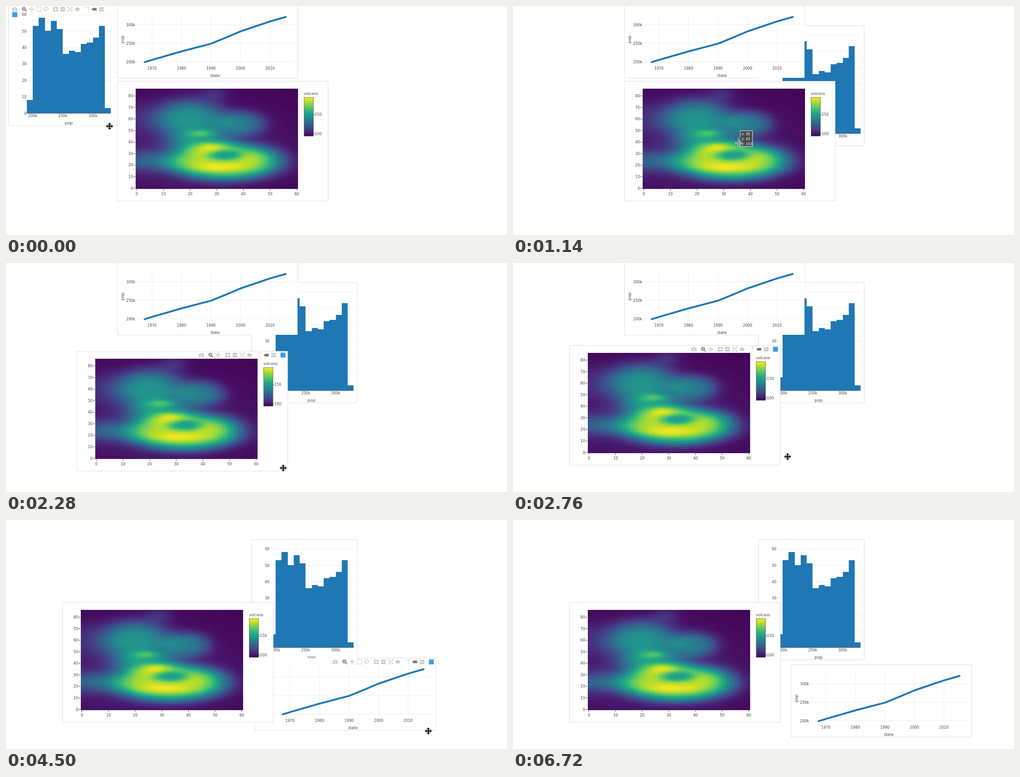
An HTML page with a canvas that plays this animation: 1105 px wide and 507 px high, repeating every 6780 ms.

```html
<!DOCTYPE html>
<html lang="en">
<head>
<meta charset="utf-8">
<title>Draggable charts</title>
<style>
html, body { margin: 0; width: 100%; height: 100%; overflow: hidden; background: #fff; }
#stage { position: relative; width: 1105px; height: 507px; overflow: hidden; }
#stage > * { position: absolute; left: 0; top: 0; }
.frame { box-sizing: border-box; border: 1px solid #ddd; }
.plot { background: #fff; clip-path: inset(1px); }
.plot > * { position: absolute; left: 0; top: 0; }
.plot canvas { left: 40.5px; top: 17px; width: 358.4px; height: 222.4px; image-rendering: pixelated; }
.over { z-index: 9; }
svg { display: block; overflow: visible; }
text { font-family: "DejaVu Sans", Verdana, sans-serif; fill: #444; }
.tip text { font: 8.67px "Liberation Sans", Arial, sans-serif; fill: #fff; }
</style>
</head>
<body>
<div id="stage"></div>
<script>
const LOOP = 6780;
const BLUE = '#1f77b4';
const stage = document.getElementById('stage');

// ---- drawing helpers ----
const text = (x, y, s, anchor = 'middle', size = 8) =>
  `<text x="${x}" y="${y}" text-anchor="${anchor}" font-size="${size}">${s}</text>`;
const title = (x, y, s) => text(x, y, s, 'middle', 9.33);
const line = (x1, y1, x2, y2, color = '#eee') =>
  `<path d="M${x1} ${y1}L${x2} ${y2}" stroke="${color}" fill="none"/>`;
const repeat = (n, fn) => Array.from({ length: n }, (_, i) => fn(i)).join('');

function add(parent, tag, cls, html = '') {
  const el = document.createElement(tag);
  el.className = cls;
  el.innerHTML = html;
  parent.append(el);
  return el;
}

// ---- motion helpers ----
const play = (el, frames) => el.animate(frames, { duration: LOOP, iterations: Infinity });

// track: [ms, x, y] key points, held after the last one
function move(el, track) {
  const held = [...track, [LOOP, ...track[track.length - 1].slice(1)]];
  play(el, held.map(([ms, x, y]) => ({ offset: ms / LOOP, transform: `translate(${x}px,${y}px)` })));
}

// spans: [from, to] times at which the element is shown
function show(el, ...spans) {
  const keys = [[0, 0], ...spans.flatMap(([from, to]) => [[from, 1], [to, 0]])];
  play(el, [...keys, [LOOP, 0]].map(([ms, opacity]) => ({ offset: ms / LOOP, opacity, easing: 'steps(1, end)' })));
}

// ---- toolbar ----
const stroke = (d, w = 1.3, dash = '') =>
  `<path d="${d}" fill="none" stroke="currentColor" stroke-width="${w}" stroke-dasharray="${dash}"/>`;
const fill = d => `<path d="${d}" fill="currentColor" fill-rule="evenodd"/>`;
const dot = (x, y, r) => `<circle cx="${x}" cy="${y}" r="${r}" fill="currentColor"/>`;
const square = 'M-5-5H5V5H-5Z';
const icons = {
  camera: fill('M-5.5-3H-3L-2-4.5H2L3-3H5.5V4.5H-5.5Z M0-2A2.6 2.6 0 1 0 .01-2Z') + dot(0, .6, 1.3),
  zoom: stroke('M-1-4.4A3.4 3.4 0 1 0-.99-4.4ZM1.6 1.6L5 5', 1.9) + stroke('M-2.6-1H.6M-1-2.6V.6', 1),
  pan: stroke('M-5 0H5M0-5V5') + fill('M-6 0L-3.5-2V2ZM6 0L3.5-2V2ZM0-6L-2-3.5H2ZM0 6L-2 3.5H2Z'),
  select: stroke(square, 1.4, '2 1.33'),
  lasso: stroke('M-3 2C-7-1-3-5 1-4.5S6 0 3 1.5-2 2.5-3 1-1 4-2 5'),
  plus: fill(square + 'M-1-3.5V-1H-3.5V1H-1V3.5H1V1H3.5V-1H1V-3.5Z'),
  minus: fill(square + 'M-3.5-1V1H3.5V-1Z'),
  fit: stroke('M-5-2V-5H-2M2-5H5V-2M5 2V5H2M-2 5H-5V2M-3.5-3.5L3.5 3.5M3.5-3.5L-3.5 3.5', 1.1),
  home: fill('M-6 0L0-5 6 0 5 1 4 .2V4.5H1.2V1.5H-1.2V4.5H-4V.2L-5 1Z'),
  spike: stroke('M-4-4H1M3-1V5', 1.2, '2 1') + dot(3, -4, 1.4),
  tag: fill('M-5.5 0L-2.5-3H5.5V3H-2.5Z'),
  tags: fill('M-5.5-2.7L-4-4.5H5.5V-.8H-4ZM-5.5 2.7L-4 .8H5.5V4.5H-4Z'),
};

// Icons sit 16 apart, with 5 more between groups
function toolbar(x, drag = 'zoom pan select lasso', wrap = false) {
  const groups = ['camera', drag, 'plus minus fit home', 'spike tag tags'];
  let at = x;
  const body = groups.map(group => {
    const part = group.split(' ').map((name, i) =>
      `<g color="${/^(zoom|tag)$/.test(name) ? '#7c7c7c' : '#c7c7c7'}" transform="translate(${at + i * 16} 9)">${icons[name]}</g>`);
    at += part.length * 16 + 5;
    return part.join('');
  }).join('');
  const [lx, ly] = wrap ? [x, 21] : [at, 9];
  return `<g class="bar">${body}<rect x="${lx - 5.5}" y="${ly - 5.5}" width="11" height="11" fill="#3d9bea"/></g>`;
}

// ---- histogram ----
const counts = [8, 53, 58, 50, 56, 51, 36, 38, 37, 42, 43, 46, 53, 3];
const binX = i => 40.5 + i * 13.25;
const countY = n => 239 - n * 3.64;

function histogram() {
  const bars = counts.map((n, i) => `H${binX(i)}V${countY(n)}H${binX(i + 1)}`).join('');
  return repeat(7, i => line(41, countY(i * 10) + .5, 226, countY(i * 10) + .5) + text(40, countY(i * 10) + 3.5, i * 10, 'end')) +
    `<path d="M40.5 239.5${bars}V239.5Z" fill="${BLUE}" shape-rendering="crispEdges"/>` +
    line(40, 239.5, 226, 239.5, '#666') +
    repeat(3, i => text(binX(1 + 5 * i), 248, 200 + i * 50 + 'k')) +
    title(133, 263.5, 'pop') + toolbar(14, undefined, true);
}

// ---- line chart ----
const trend = [[1967.5, 199], [1970, 205], [1980, 228], [1990, 249], [1995, 265], [2000, 282], [2010, 309], [2015.3, 321]];
const yearX = year => 77 + (year - 1970) * 6.51;
const popY = k => 42.5 + (300 - k) * .82;

function lineChart() {
  return repeat(3, i => line(43, popY(200 + i * 50), 392, popY(200 + i * 50)) + text(40, popY(200 + i * 50) + 3, 200 + i * 50 + 'k', 'end')) +
    repeat(5, i => line(yearX(1970 + i * 10), 17, yearX(1970 + i * 10), 131) + text(yearX(1970 + i * 10), 142, 1970 + i * 10)) +
    `<polyline points="${trend.map(([year, k]) => [yearX(year), popY(k)])}" fill="none" stroke="${BLUE}" stroke-width="4" stroke-linecap="round" stroke-linejoin="round"/>` +
    title(216, 157.5, 'date') +
    `<g transform="translate(15 75) rotate(-90)">${title(0, 0, 'pop')}</g>` + toolbar(177);
}

// ---- heat map ----
const viridis = ['440154', '482475', '414487', '355f8d', '2a788e', '21918c', '22a884', '44bf70', '7ad151', 'bddf26', 'fde725'];

// The land is a sum of smooth hills; a higher power gives a flatter top
function height(x, y) {
  const hill = (cx, cy, rx, ry, h, power = 1) =>
    h * Math.exp(-((((x - cx) / rx) ** 2 + ((y - cy) / ry) ** 2) ** power));
  const cone = hill(33, 23, 21, 16, 78, 2) + hill(46, 28, 8, 11, 11) + hill(31, 18, 11, 4, 14);
  const crater = hill(33, 29, 6.5, 4.5, -33, 1.4);
  const ridge = hill(24, 40, 13, 10, 34, 1.5) + hill(27, 37, 5, 3, 12) + hill(25, 48, 5, 3, 17);
  const north = hill(20, 60, 13, 17, 46, 1.5) + hill(39, 56, 9, 11, 36, 1.5) + hill(29, 82, 5, 6, 10);
  const west = hill(4, 24, 16, 9, 26) + hill(2, 61, 10, 14, 9);
  const z = 94 + hill(22, 30, 45, 50, 8) + cone + crater + ridge + north + west;
  return Math.round(Math.min(195, z));
}

function shade(z) {
  const u = (z - 94) / 10.1, i = Math.min(9, Math.floor(u));
  const part = (s, k) => parseInt(s.slice(k, k + 2), 16);
  const mix = k => Math.round(part(viridis[i], k) + (u - i) * (part(viridis[i + 1], k) - part(viridis[i], k)));
  return `rgb(${mix(0)},${mix(2)},${mix(4)})`;
}

function paintHeat(canvas) {
  canvas.width = 61;
  canvas.height = 87;
  const ctx = canvas.getContext('2d');
  for (let y = 0; y < 87; y++) {
    for (let x = 0; x < 61; x++) {
      ctx.fillStyle = shade(height(x, y));
      ctx.fillRect(x, 86 - y, 1, 1);
    }
  }
}

const cellX = x => 43.5 + x * 5.875;
const cellY = y => 237.6 - y * 2.556;
const scaleY = z => 122 - (z - 94) * .85;

function heatMap() {
  const stops = viridis.map((c, i) => `<stop offset="${i / 10}" stop-color="#${c}"/>`).join('');
  return `<defs><linearGradient id="scale" x1="0" y1="1" x2="0" y2="0">${stops}</linearGradient></defs>` +
    repeat(9, i => line(36, cellY(i * 10), 40, cellY(i * 10), '#444') + text(35, cellY(i * 10) + 3, i * 10, 'end')) +
    repeat(7, i => line(cellX(i * 10), 239.5, cellX(i * 10), 243, '#444') + text(cellX(i * 10), 252.5, i * 10)) +
    text(412, 31, 'volcano', 'start') +
    '<rect x="412.5" y="36.5" width="20.5" height="85.5" fill="url(#scale)" stroke="#444" stroke-width=".7"/>' +
    repeat(2, i => line(433, scaleY(100 + i * 50), 436, scaleY(100 + i * 50), '#444') + text(436, scaleY(100 + i * 50) + 3, 100 + i * 50, 'start')) +
    toolbar(275, 'zoom pan');
}

// ---- cards: each is dragged once along its track, held at its grip ----
const hist = { w: 234, h: 267, draw: histogram, grip: [223, 268], frameZ: 2, plotZ: 2, bar: [[0, 780], [2850, 3240]],
  track: [[0, 5, -2], [720, 276, 50], [900, 694, 24], [1080, 541, 43]] };
const trendCard = { w: 399, h: 161, draw: lineChart, grip: [364, 153], frameZ: 1, plotZ: 3, bar: [[3240, 6120]],
  track: [[0, 245, -1], [3660, 245, -1], [4080, 286, 85], [4320, 440, 250], [4560, 585, 323], [4800, 613, 320]] };
const heat = { w: 466, h: 266, draw: heatMap, grip: [461, 261], frameZ: 4, plotZ: 4, bar: [[1260, 2820]],
  track: [[0, 245, 166], [1500, 245, 166], [1740, 428, 25], [2280, 156, 195], [2460, 124, 182]] };

for (const card of [hist, trendCard, heat]) {
  const frame = add(stage, 'div', 'frame');
  const plot = add(stage, 'div', 'plot');
  if (card === heat) paintHeat(add(plot, 'canvas', ''));
  plot.insertAdjacentHTML('beforeend', `<svg width="${card.w}" height="${card.h}">${card.draw()}</svg>`);
  for (const [el, z] of [[frame, card.frameZ], [plot, card.plotZ]]) {
    el.style.cssText = `width:${card.w}px;height:${card.h}px;z-index:${z}`;
    move(el, card.track);
  }
  show(plot.querySelector('.bar'), ...card.bar);
}

// ---- hover labels ----
function tip(span, x, y, w, color, rows) {
  const h = rows.length * 11 + 2, top = -h / 2;
  const el = add(stage, 'div', 'tip over', `<svg width="1" height="1"><path d="M0 0L4-4V${top}H${w + 4}V${-top}H4V4Z" fill="${color}" stroke="#fff"/>` +
    rows.map((s, i) => `<text x="7" y="${top + 10 + i * 11}">${s}</text>`).join('') + '</svg>');
  el.style.transform = `translate(${x}px,${y}px)`;
  show(el, span);
}
function binTip(span, i) {
  const from = 190 + i * 10;
  tip(span, 541 + binX(i + 1) + .5, 43 + countY(counts[i]), 80, BLUE, [`(${from}k - ${from + 9}.99k, ${counts[i]})`]);
}
tip([1100, 1240], 245 + cellX(35) + 3, 166 + cellY(43), 27, '#484848', ['x: 35', 'y: 43', 'z: 153']);
binTip([2880, 2940], 7);
binTip([2940, 3120], 8);
binTip([4020, 4200], 4);

// ---- pointer ----
const pointer = add(stage, 'div', 'over', `<svg width="1" height="1">
  <g><path d="M0-9L9 0 0 9-9 0Z" fill="#bbb" opacity=".75"/>
    <path d="M-5 0H5M0-5V5" stroke="#000" stroke-width="2"/>
    <path d="M-7.5 0L-4-3V3ZM7.5 0L4-3V3ZM0-7.5L-3-4H3ZM0 7.5L-3 4H3Z"/></g>
  <g><path d="M-8 0H8M0-8V8" stroke="#fff" stroke-width="3"/>
    <path d="M-7.5 0H7.5M0-7.5V7.5" stroke="#333" stroke-width="1.2"/></g>
  <g><path d="M0-2V14L3.7 10.6 6.3 16.6 9 15.4 6.4 9.6H11.3Z" stroke="#fff"/></g></svg>`);
const [grab, cross, arrow] = pointer.querySelectorAll('g');
show(grab, [0, 1090], [1400, 2820], [3360, 4000], [4230, 5160]);
show(cross, [1090, 1400], [2820, 3360], [4000, 4230]);
show(arrow, [5160, LOOP]);

// A dragging pointer runs slightly ahead of its card
const LEAD = 30;
const drag = ({ track, grip }, from) => track.filter(([ms]) => ms >= from)
  .map(([ms, x, y]) => [Math.max(0, ms - LEAD), x + grip[0], y + grip[1]]);
move(pointer, [
  ...drag(hist, 0), [1140, 497, 303],
  ...drag(heat, 1500), [2760, 605, 430], [2880, 681, 270],
  ...drag(trendCard, 3660), [5800, 977, 474], [6120, 985, 520],
]);
</script>
</body>
</html>
```
